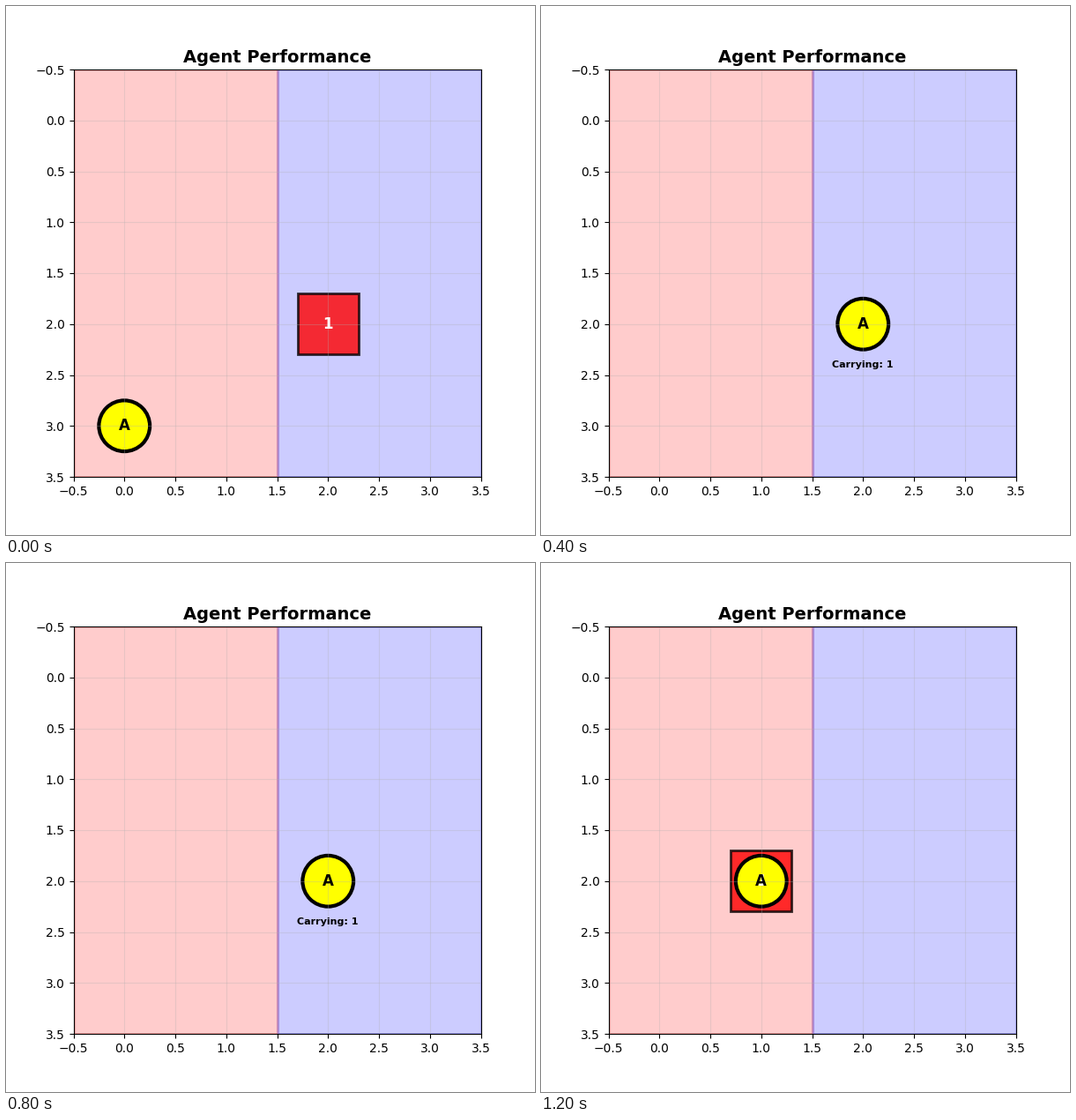
These frames come from a looping animation (600x600 px, 1.3 s). A matplotlib script:

```python
import matplotlib.pyplot as plt
from matplotlib.animation import FuncAnimation
from matplotlib.patches import Circle, Rectangle

plt.rcParams["font.family"] = "DejaVu Sans"

START, BLOCK = (0, 3), (2, 2)
SIZE, RADIUS = 0.6, 0.25
ACTIONS = ["right", "right", "up"] + ["pick", "drop"] * 3 + ["pick", "left", "drop"]
MOVES = {"right": (1, 0), "left": (-1, 0), "up": (0, -1)}


def simulate():
    """Return (agent, block, carrying) for the start and after each action."""
    agent, block, carrying = START, BLOCK, False
    states = [(agent, block, carrying)]
    for action in ACTIONS:
        if action in MOVES:
            dx, dy = MOVES[action]
            agent = (agent[0] + dx, agent[1] + dy)
        else:
            carrying = action == "pick"
        if carrying or action == "drop":
            block = agent
        states.append((agent, block, carrying))
    return states


def zone(x, color):
    ax.add_patch(Rectangle((x, -0.5), 2, 4, facecolor=color, edgecolor=color,
                           linewidth=2, alpha=0.2))


def label(text, size, color="black"):
    return ax.text(0, 0, text, fontsize=size, color=color, fontweight="bold",
                   ha="center", va="center")


STATES = simulate()

fig, ax = plt.subplots(figsize=(6, 6), dpi=100)
ax.set_xlim(-0.5, 3.5)
ax.set_ylim(3.5, -0.5)
ax.set_aspect("equal")
ax.grid(True, alpha=0.3)
ax.set_title("Agent Performance", fontsize=14, fontweight="bold")

zone(-0.5, "red")
zone(1.5, "blue")

box = ax.add_patch(Rectangle((0, 0), SIZE, SIZE, facecolor="red",
                             edgecolor="black", linewidth=2, alpha=0.8))
box_label = label("1", 12, "white")
disc = ax.add_patch(Circle((0, 0), RADIUS, facecolor="yellow",
                           edgecolor="black", linewidth=3))
disc_label = label("A", 12)
load_label = label("Carrying: 1", 8)


def update(i):
    (x, y), (bx, by), carrying = STATES[i]
    box.set_xy((bx - SIZE / 2, by - SIZE / 2))
    box_label.set_position((bx, by))
    disc.center = (x, y)
    disc_label.set_position((x, y))
    load_label.set_position((x, y + 0.4))
    box.set_visible(not carrying)
    box_label.set_visible(not carrying)
    load_label.set_visible(carrying)
    return box, box_label, disc, disc_label, load_label


anim = FuncAnimation(fig, update, frames=len(STATES), interval=100,
                     repeat=True, repeat_delay=0)
plt.show()
```
